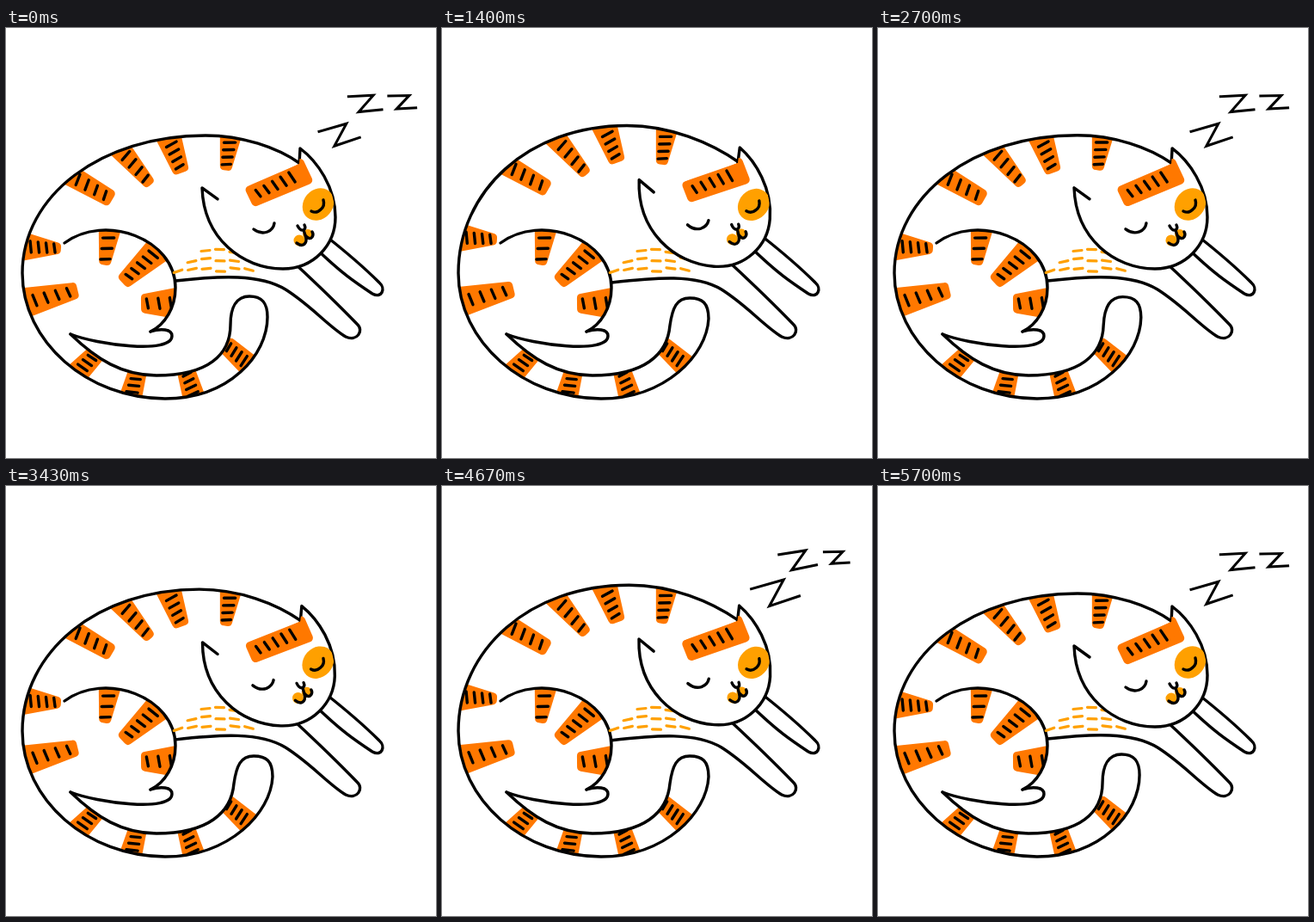
An HTML page that plays this animation: 500 by 500 pixels, repeating every 5.73 s.

```html
<!DOCTYPE html>
<html lang="en">
<head>
<meta charset="utf-8">
<title>Sleeping cat</title>
<style>
  html, body { margin: 0; width: 100%; height: 100%; overflow: hidden; background: #fff; }
  svg { display: block; width: 100%; height: 100%; }
  .line { fill: none; stroke: #000; stroke-width: 3.4; stroke-linecap: round; stroke-linejoin: round; }
  .skin { fill: #fff; }
  .stripe { fill: #ff7800; stroke: #ff7800; stroke-width: 10; stroke-linejoin: round; }
  .patch { fill: #ffa000; }
  .fleck { fill: none; stroke: #ffa000; stroke-width: 3.2; stroke-linecap: round; }
  .zed { stroke-width: 3; vector-effect: non-scaling-stroke; stroke-linecap: square; stroke-linejoin: miter; }
</style>
</head>
<body>
<svg viewBox="0 0 500 500">
  <defs>
    <clipPath id="bodyClip"><path id="bodyFill"/></clipPath>
    <clipPath id="legClip"><use href="#leg"/></clipPath>
    <clipPath id="headClip"><path id="headFill"/></clipPath>
  </defs>
  <g id="bodyMarks" clip-path="url(#bodyClip)"></g>
  <g id="legMarks" clip-path="url(#legClip)"></g>
  <path id="body" class="line"/>
  <path id="leg" class="line" d="M68 250C115 215 197 245 197 302C197 325 185 345 168 353" />
  <path class="line" d="M75 356C105 368 193 380 193 358C193 350 180 349 168 353"/>
  <path class="line" d="M360 256C390 285 405 295 426 309C437 315 442 303 434 296Q410 272 372 242"/>
  <path id="belly" class="line"/>
  <g id="flecks"></g>
  <g id="head">
    <path id="face" class="line skin"/>
    <g id="headMarks" clip-path="url(#headClip)">
      <ellipse class="patch" cx="363" cy="205" rx="17" ry="20" transform="rotate(40 363 205)"/>
    </g>
    <g class="patch"><circle cx="341" cy="247" r="6.5"/><circle cx="351" cy="240" r="6"/></g>
    <path class="line" d="M288 234Q296 240 304 237Q311 234 312 227M355 213Q361 216 366 211Q371 207 369 200"/>
    <path class="line" d="M339 230Q342 236 346 235Q349 233 347 229M346 235L348 241M338 250Q345 255 348 250Q350 247 348 241Q353 247 356 243Q358 240 356 237"/>
  </g>
  <g id="zeds"></g>
</svg>
<script>
const LOOP = 5730, BREATH = LOOP / 2;
const $ = id => document.getElementById(id);
const set = (node, attrs) => { for (const k in attrs) node.setAttribute(k, attrs[k]); return node; };
const ramp = (a, b, v) => Math.max(0, Math.min(1, (v - a) / (b - a)));
const smooth = (a, b, v) => { const t = ramp(a, b, v); return t * t * (3 - 2 * t); };

function add(parent, tag, attrs) {
  const node = document.createElementNS('http://www.w3.org/2000/svg', tag);
  parent.append(set(node, attrs));
  return node;
}

// Tapered stripe that starts at an edge point and heads for a focus, with ticks across it
function stripe(parent, focus, { x, y, length, width, taper = 0.55, count = 4 }) {
  const angle = Math.atan2(focus.y - y, focus.x - x) * 180 / Math.PI;
  const group = add(parent, 'g', {});
  const inner = add(group, 'g', { transform: `translate(${x} ${y}) rotate(${angle})` });
  const base = width / 2 - 5, tip = width * taper / 2 - 5, end = length - 5;
  add(inner, 'path', { class: 'stripe', d: `M-5 ${-base}L${end} ${-tip}V${tip}L-5 ${base}Z` });
  let d = '';
  for (let i = 0; i < count; i++) {
    const at = length * (0.16 + 0.66 * i / (count - 1));
    const half = 6.5 - i * 0.5;
    d += `M${at - 1} ${-half}L${at + 1} ${half}`;
  }
  add(inner, 'path', { class: 'line', d });
  return { group, x, y };
}

const backFocus = { x: 240, y: 267 }, legFocus = { x: 108, y: 321 }, tailFocus = { x: 180, y: 300 };

const backStripes = [
  { x: 76, y: 172, length: 55, width: 25, taper: 0.8 },
  { x: 134, y: 142, length: 53, width: 26 },
  { x: 190, y: 129, length: 42, width: 30, taper: 0.65 },
  { x: 261, y: 127, length: 39, width: 26 },
  { x: 22, y: 254, length: 42, width: 35, taper: 0.4 },
  { x: 24, y: 319, length: 61, width: 36 }
].map(s => stripe($('bodyMarks'), backFocus, s));

[[85, 399], [145, 429], [219, 431], [281, 391]].forEach(([x, y]) =>
  stripe($('bodyMarks'), tailFocus, { x, y, length: 36, width: 27, taper: 0.8 }));

[
  { x: 120, y: 238, length: 38, width: 26, count: 3 },
  { x: 178, y: 257, length: 58, width: 34, count: 5 },
  { x: 198, y: 320, length: 41, width: 38, taper: 0.6, count: 3 }
].forEach(s => stripe($('legMarks'), legFocus, s));

stripe($('headMarks'), { x: 283, y: 197 }, { x: 342, y: 169, length: 66, width: 32, taper: 0.8, count: 5 });

// Belly fur: three widening rows of short dashes
for (let row = 0; row < 3; row++) {
  const count = 3 + Math.ceil(row * 1.5);
  for (let i = 0; i < count; i++) {
    const x = 232 - row * 16 + i * 16.5, y = 259 + row * 11 + 2 * Math.sin(i * 4 + row);
    const tilt = -20 + (x - 196) * 0.4;
    add($('flecks'), 'path', { class: 'fleck', d: 'M-5 0H5', transform: `translate(${x} ${y}) rotate(${tilt})` });
  }
}

const zeds = [
  { x: 388, y: 124, size: 1.38, turn: -16, start: 1500, drift: [0, 0, 0] },
  { x: 418, y: 87.5, size: 1.2, turn: -3, start: 1590, drift: [-4, -1.5, -6] },
  { x: 461, y: 86, size: 1, turn: -1, start: 1680, drift: [-2, -3, 0] }
].map(z => ({ ...z, node: add($('zeds'), 'path', { class: 'line zed', d: 'M-16-7.3L8-7.3L-7 8L15.5 7' }) }));

// Pop in past full size, hold, then shrink away early in the next breath
function zedScale(phase, start) {
  if (phase < 1000) return 1 - smooth(150, 450, phase);
  const peak = 1950;
  return phase < peak
    ? 1.35 * Math.sin(ramp(start, peak, phase) * Math.PI / 2)
    : 1.35 - 0.35 * smooth(peak, 2030, phase);
}

function bodyPath(b, w) {
  const top = 125 - 11.5 * b;
  return `M75 356C105 385 135 404 175 404C235 404 ${261 + w} 380 ${261 + 4 * w} ${345 + w}` +
    `C${261 + 7 * w} 325 ${268 + 5 * w} ${312 + 2 * w} ${283 + 5 * w} ${312 + 2 * w}` +
    `S${304 + 6 * w} 320 ${304 + 6 * w} ${336 + 2 * w}C${304 + 4 * w} 380 260 431 185 431` +
    `C95 431 19 365 19 285C19 ${195 - 5 * b} ${110 - 10 * b} ${top} ${232 - 17 * b} ${top}` +
    `C${275 - 10 * b} ${top} ${315 - 3 * b} ${139 - 6 * b} ${341 + 4 * b} ${157 - b}`;
}

function headPath(flick) {
  const tip = `${228 - 10 * flick} ${186 + 15 * flick}`;
  return `M${246 - 2 * flick} ${199 + flick}L${tip}C230 245 275 280 322 280` +
    'C358 280 383 252 383 220C383 185 362 155 342 140L341 158';
}

function draw(time) {
  const phase = time % BREATH;
  const breath = 1 - ((1 + Math.cos((phase + 42) / BREATH * 2 * Math.PI)) / 2) ** 1.15;
  const wag = smooth(0, 450, phase) - smooth(BREATH - 450, BREATH, phase);
  const flick = smooth(2085, 2190, phase) - smooth(2280, 2385, phase);

  const body = bodyPath(breath, wag), head = headPath(flick);
  set($('body'), { d: body });
  set($('bodyFill'), { d: body + 'Z' });
  set($('face'), { d: head });
  set($('headFill'), { d: head + 'Z' });
  set($('head'), { transform: `translate(${-1.5 * breath} ${-3.5 * breath}) rotate(${4.2 * breath} 310 220)` });
  set($('belly'), {
    d: `M197 ${294 + 2 * breath}C250 ${288 + 2 * breath} 295 286 325 304C355 323 375 347 395 359` +
      'C408 365 417 352 408 344Q380 315 336 274'
  });

  for (const { group, x, y } of backStripes) {
    const lift = 12 * breath * smooth(340, 230, y) * (1 - 0.5 * ramp(200, 270, x));
    set(group, { transform: `translate(0 ${-lift})` });
  }

  const unsettled = phase < 1000 ? 0 : 1 - ramp(2030, 2600, phase);
  for (const { node, x, y, size, turn, start, drift } of zeds) {
    const scale = zedScale(phase, start);
    const [dx, dy, spin] = drift.map(v => v * unsettled);
    set(node, {
      transform: `translate(${x + dx} ${y + dy}) rotate(${turn + spin}) scale(${size * scale})`,
      visibility: scale > 0.01 ? 'visible' : 'hidden'
    });
  }
}

const began = performance.now();
function tick() {
  draw((performance.now() - began) % LOOP);
  requestAnimationFrame(tick);
}
tick();
</script>
</body>
</html>
```
